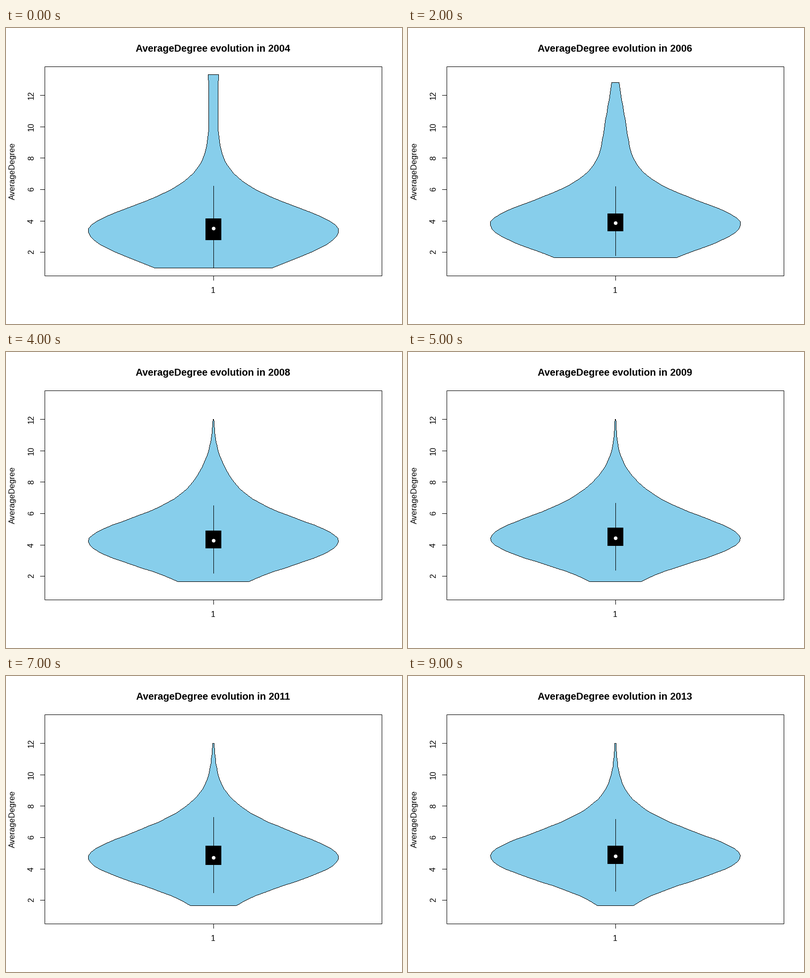
A matplotlib script that plays this animation: 800x600 px, repeating every 10 s.

```python
import numpy as np
import matplotlib.pyplot as plt
from matplotlib.animation import FuncAnimation
from matplotlib.patches import Circle, Polygon, Rectangle

W, H, DPI = 800, 600, 100
PX = 72 / DPI           # one pixel in points
CX, HALF = 419, 252.5   # violin column and widest half width
FIRST, COUNT = 2004, 10
plt.rcParams["font.family"] = "Liberation Sans"
plt.rcParams["path.simplify"] = False


def key(t, points):
    return np.interp(t, list(points), list(points.values()))


def peak_row(t):
    return key(t, {0: 411, 1: 407, 3: 389, 5: 378.5, 7: 368.5, 9: 365.5})


def violin(t):
    """Pixel vertices of the outline, t years after the first."""
    peak = peak_row(t)
    bottom = 486 if t < 2 else 465
    top = key(t, {1: 94, 2: 110, 3: 130, 4: 136})
    y = np.linspace(bottom, top, 50)
    up = peak - y

    # below the peak a bell, above it a bell with an exponential tail
    below = np.exp(-(up / key(t, {0: 61, 5: 48.6, 7: 52.4, 9: 50.7})) ** 2 / 2)
    spread = key(t, {0: 81, 4: 75, 7: 81, 9: 77})
    above = np.exp(-2.5 * (np.hypot(1, up / spread) - 1))

    # outliers swell the neck and sink into the body over the years
    centre = 70 + 260 * np.exp(-t / 2.4)
    swell = key(t, {0: 10, 1: 10, 2: 19, 5: 12, 7: 4})
    hump = swell * np.exp(-((up - centre) / (0.4 * centre)) ** 2 / 2)

    w = np.where(up < 0, HALF * below, HALF * above + hump)
    w = np.minimum(w * HALF / w.max(), HALF)
    left, right = np.c_[CX - w, y], np.c_[CX + w, y]
    return np.floor(np.r_[left, right[::-1]])


def box_rows(t):
    """Upper whisker, box top, median, box bottom, lower whisker."""
    median = peak_row(t) - 5.5 * np.exp(-t / 3)
    q3 = median - key(t, {3: 19.5, 7: 23.5, 9: 21.5})
    q1 = median + 15.5 + 9 * np.exp(-t / 1.2)
    hi = key(t, {0: 320, 1: 326, 5: 306, 7: 286, 9: 290})
    lo = key(t, {0: 486, 1: 481, 2: 462, 5: 443, 9: 437})
    return np.round([hi, q3, median, q1, lo])


def trace(corners):
    """One short dash per pixel along a closed outline, for a crisp edge."""
    runs = []
    for p, q in zip(corners, np.roll(corners, -1, axis=0)):
        n = int(np.abs(q - p).max())
        runs.append(np.linspace(p, q, n, endpoint=False))
    x, y = np.floor(np.concatenate(runs) + 0.5).T
    gap = np.full_like(x, np.nan)
    return np.c_[x, x + 1, gap].ravel(), np.c_[y, y, gap].ravel() + 0.5


fig = plt.figure(figsize=(W / DPI, H / DPI), dpi=DPI, facecolor="white")
ax = fig.add_axes([0, 0, 1, 1])
ax.set_xlim(0, W)
ax.set_ylim(H, 0)
ax.axis("off")


def line(xs, ys, z=1):
    return ax.plot(xs, ys, color="black", lw=PX, snap=False,
                   solid_capstyle="butt", zorder=z)[0]


def label(x, y, s, size=16, **kw):
    return ax.text(x, y, s, fontsize=size * PX, ha="center", va="baseline",
                   rotation_mode="anchor", **kw)


mid = CX + 0.5
ax.add_patch(Rectangle((78.5, 78.5), 681, 424, fill=False, ec="black",
                       lw=PX, snap=False))
for v in range(2, 13, 2):
    row = np.floor(518.4 - 31.83 * v)
    line([69, 79], [row + 0.5, row + 0.5])
    label(56, row, str(v), rotation=90)
line([mid, mid], [502, 512])
label(418.5, 537, "1")
label(18, 290, "AverageDegree", 16.5, rotation=90)
title = label(418.5, 48, "", 19.9, weight="bold")

body = ax.add_patch(Polygon(violin(0) + 0.5, fc="#87CEEB", lw=0, zorder=2))
edge = line([], [], 3)
whisker = line([mid, mid], [0, 0], 4)
box = ax.add_patch(Rectangle((403, 0), 32, 0, fc="black", lw=0, zorder=5))
dot = ax.add_patch(Circle((mid, 0), 3.7, fc="white", lw=0, zorder=6))


def draw(t):
    title.set_text(f"AverageDegree evolution in {FIRST + t}")
    corners = violin(t)
    body.set_xy(corners + 0.5)
    edge.set_data(*trace(corners))
    hi, q3, median, q1, lo = box_rows(t)
    whisker.set_ydata([hi, lo])
    box.set_y(q3)
    box.set_height(q1 - q3)
    dot.center = (mid, median + 0.5)
    return title, body, edge, whisker, box, dot


anim = FuncAnimation(fig, draw, frames=COUNT, interval=1000, repeat=True,
                     repeat_delay=0, blit=False)
plt.show()
```
